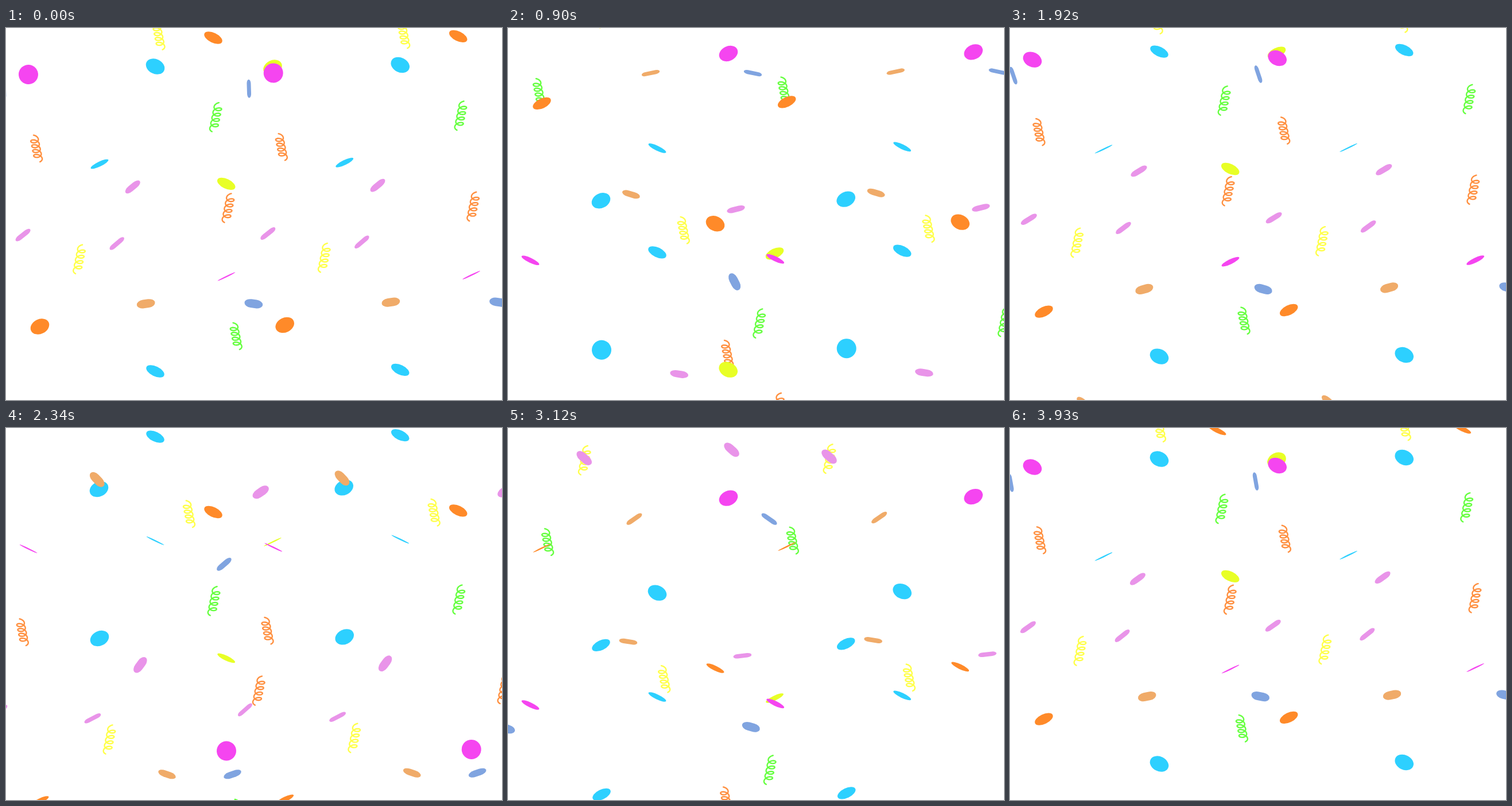
Write an HTML page with a canvas that moves like this. It is 864 px wide and 648 px high and loops after 3960 ms.

```html
<!DOCTYPE html>
<html lang="en">
<head>
<meta charset="utf-8">
<title>Confetti</title>
<style>
  html, body { margin: 0; width: 100%; height: 100%; overflow: hidden; background: #fff; }
  canvas { display: block; width: 864px; height: 648px; }
</style>
</head>
<body>
<canvas id="stage" width="864" height="648"></canvas>
<script>
const ctx = document.getElementById('stage').getContext('2d');
const LOOP = 3960, CYCLE = 55;
const COPIES = [[0, 0], [426.7, -2.6]];
const FALL = 712.3, COIL_FALL = 769;
const MAGENTA = '#f545f0', BLUE = '#2dd0ff', ORANGE = '#ff8a29', YELLOW = '#e8ff26';
const VIOLET = '#e994e9', TAN = '#f0ab69', STEEL = '#80a4e0';
const LEMON = '#ffff4a', GREEN = '#66ff40', COPPER = '#ff9040';

// Discs drop straight down: colour, x, y, tilt side, phase of the flip
const discs = [
  [YELLOW, 464.5, 69, -1, -0.079],
  [MAGENTA, 39, 81, 1, -0.009],
  [BLUE, 260, 67, 1, -0.079],
  [ORANGE, 361, 17, 1, -0.266],
  [ORANGE, 59, 520, -1, -0.145],
  [BLUE, 260, 598, 1, 0.225],
  [BLUE, 163, 237, -1, 0.604],
  [YELLOW, -43, 274, 1, -0.195],
  [MAGENTA, 384, 433, -1, 0.494],
  [BLUE, 162, -23, -1, -0.459]
];

// Flakes: colour, x, y, sway side, sway peak, bob peak, tilt, rocking, rocking peak
const flakes = [
  [VIOLET, 262, 277, 1, 30, 14, -10, 45, 35],
  [VIOLET, -9, 357, 1, 51, 9, -2, 45, 33],
  [VIOLET, 157, 370, 1, 50, 6, 0, 42, 30],
  [VIOLET, 440, -11, -1, 24.5, 35, -20, 15, 35],
  [TAN, 240, 474, 1, 13, 51, -15, 35, 12],
  [TAN, 172, -33, 1, 26.5, 40, 28, 20, 6],
  [STEEL, -12, 115, 1, 43, 30, 65, 75, 11],
  [STEEL, 435, 474, -1, 13, 51, 15, -35, 12]
];

// Coils: colour, x, y, lean side, sway peak, bob peak
const coils = [
  [LEMON, 141, 398, 1, 16, 5],
  [LEMON, 279, 9, -1, 16, 53],
  [GREEN, 407, 160, 1, 33, 21],
  [GREEN, 18, 536, -1, 32, 47],
  [COPPER, 2, 215, -1, 1, 22],
  [COPPER, 425, 312, 1, 21, 11]
];

// One swing per cycle, highest at the given peak.
const wave = (u, peak) => Math.cos(2 * Math.PI * (u - peak) / CYCLE);

const dropped = (y, u, height, margin) =>
  ((y + height * u / CYCLE + margin) % height + height) % height - margin;

function stamp(x, y, draw) {
  for (const [dx, dy] of COPIES) {
    ctx.save();
    ctx.translate(x + dx, y + dy);
    draw();
    ctx.restore();
  }
}

function drawDisc(u, [color, x, y, side, phase]) {
  // Three half turns per cycle, in eight poses each.
  const pose = Math.round(8 * (3 * u / CYCLE + phase));
  const edge = ((pose + 4) % 8 + 8) % 8 - 4;
  const minor = Math.max(1.2, 17 * (1 - Math.abs(edge) / 4));
  stamp(x, dropped(y, u, FALL, 32), () => {
    ctx.fillStyle = color;
    ctx.beginPath();
    ctx.ellipse(0, 0, 17, minor, side * 0.45, 0, 2 * Math.PI);
    ctx.fill();
  });
}

function drawFlake(u, [color, x, y, side, peak, bobPeak, tilt, rock, rockPeak]) {
  const w = 32, h = 11 + 4 * wave(u, peak - 16);
  const angle = tilt + rock * wave(u, rockPeak);
  const top = dropped(y + 7 * wave(u, bobPeak), u, FALL, 32);
  stamp(x + side * 43 * wave(u, peak), top, () => {
    ctx.rotate(angle * Math.PI / 180);
    ctx.fillStyle = color;
    ctx.beginPath();
    ctx.roundRect(-w / 2, -h / 2, w, h, { x: Math.min(w * 0.36, h), y: h / 2 });
    ctx.fill();
  });
}

function drawCoil(u, [color, x, y, lean, peak, bobPeak]) {
  const run = 40 + 2 * lean;
  const top = dropped(y + 6 * wave(u, bobPeak), u, COIL_FALL, 60);
  stamp(x + 51 * wave(u, peak), top, () => {
    ctx.scale(lean, 1);
    ctx.strokeStyle = color;
    ctx.lineWidth = 2.4;
    ctx.lineCap = ctx.lineJoin = 'round';
    ctx.beginPath();
    for (let s = 0; s <= 1; s += 0.01) {
      const a = (9 * s - 0.5) * Math.PI;
      const py = (s - 0.5) * run + 4.5 * Math.sin(a);
      ctx.lineTo(-7 * Math.cos(a) - 0.2 * py, py);
    }
    ctx.stroke();
  });
}

// Five steps every 180 ms; the first of them is held twice as long.
function stepAt(ms) {
  return 5 * Math.floor(ms / 180) + Math.max(0, Math.floor(ms % 180 / 30) - 1);
}

const start = performance.now();
function render() {
  const ms = Math.max(0, performance.now() - start) % LOOP;
  const u = stepAt(ms) % CYCLE;
  ctx.fillStyle = '#fff';
  ctx.fillRect(0, 0, 864, 648);
  for (const c of coils) drawCoil(u, c);
  for (const d of discs) drawDisc(u, d);
  for (const f of flakes) drawFlake(u, f);
  requestAnimationFrame(render);
}
render();
</script>
</body>
</html>
```
